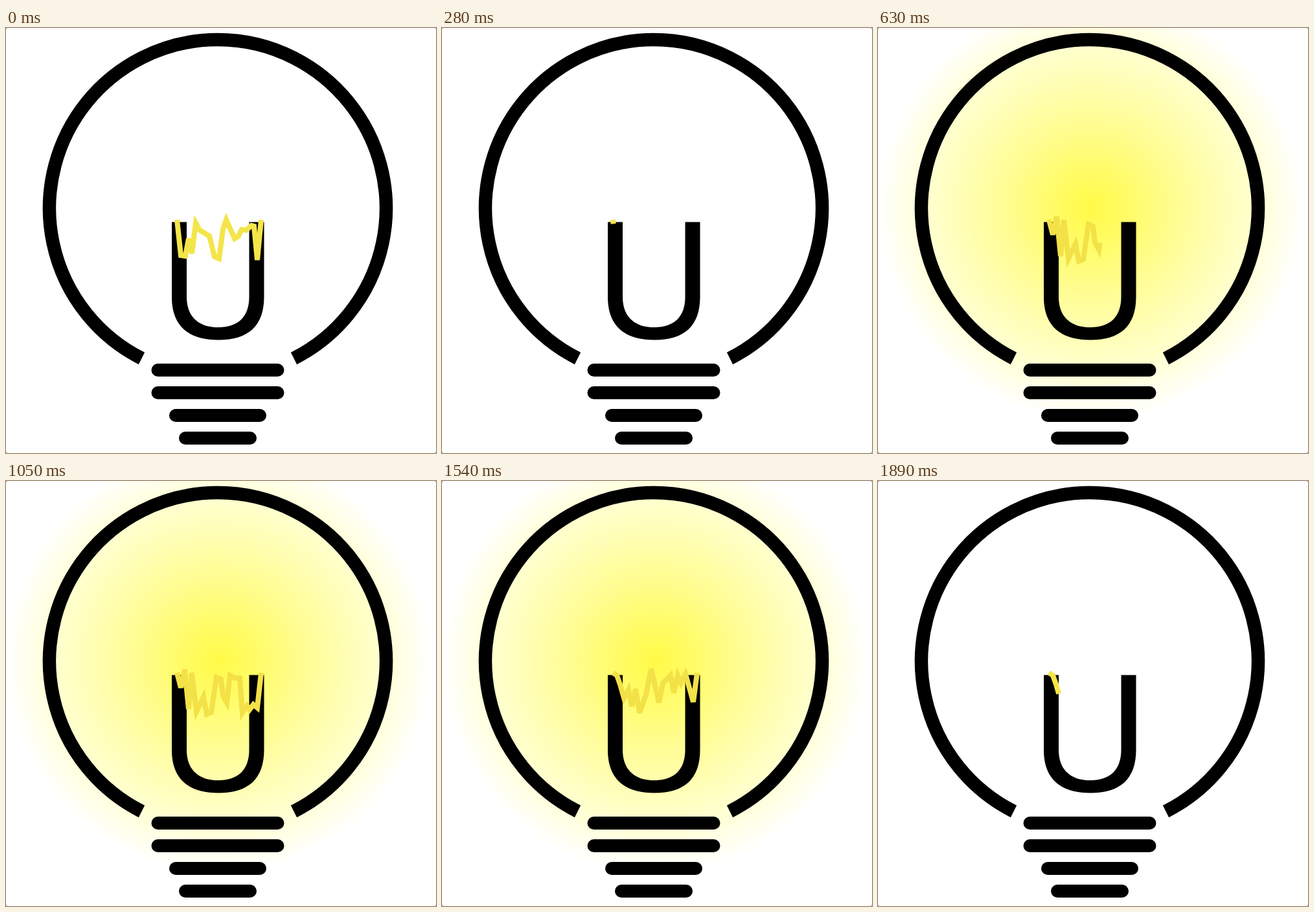
An HTML page without scripts for the animation above (1.96 s loop, 664x656 px).

```html
<!DOCTYPE html>
<html lang="en">
<head>
<meta charset="utf-8">
<title>Light bulb</title>
<style>
  html, body { margin: 0; width: 100%; height: 100%; overflow: hidden; background: #888; }
  svg { display: block; width: 664px; height: 656px; }

  .glow, .spark { animation: 1960ms step-end infinite; }
  .glow { animation-name: glow; }
  .spark {
    fill: none;
    stroke: #f3e54a;
    stroke-width: 8;
    stroke-dasharray: 100 200;
    stroke-dashoffset: 100;
  }
  .a { animation-name: fade-out; }
  .b { animation-name: pulse, warm; }
  .c { animation-name: flash, warm; }

  @keyframes glow {
    0%, 82.14% { opacity: 0; }
    17.85% { opacity: 1; }
  }
  @keyframes warm {
    0%, 82.14% { stroke: #f3e54a; }
    17.85% { stroke: #f3e148; }
  }
  /* The sparks run in and out along their own line */
  @keyframes fade-out {
    0% { stroke-dashoffset: 0; animation-timing-function: steps(4); }
    14.28% { stroke-dashoffset: 98.7; }
    17.85%, 100% { stroke-dashoffset: 100; }
  }
  @keyframes pulse {
    0% { stroke-dashoffset: 100; }
    17.85% { stroke-dashoffset: 73; animation-timing-function: steps(2); }
    25% { stroke-dashoffset: 3; }
    28.57% { stroke-dashoffset: 8; animation-timing-function: steps(3); }
    39.28% { stroke-dashoffset: 82; }
    42.85% { stroke-dashoffset: 94; animation-timing-function: steps(3); }
    53.57% { stroke-dashoffset: 0; }
    57.14% { stroke-dashoffset: 16; animation-timing-function: steps(3); }
    67.85% { stroke-dashoffset: 90; }
    71.42%, 100% { stroke-dashoffset: 100; }
  }
  @keyframes flash {
    0% { stroke-dashoffset: 100; }
    71.42% { stroke-dashoffset: 80; animation-timing-function: steps(2); }
    78.57% { stroke-dashoffset: 0; }
    82.14% { stroke-dashoffset: 0; animation-timing-function: steps(4); }
    96.42%, 100% { stroke-dashoffset: 92.5; }
  }
</style>
</head>
<body>
<svg viewBox="0 0 664 656">
  <defs>
    <radialGradient id="light">
      <stop offset="0" stop-color="#fffa46"/>
      <stop offset=".2" stop-color="#fffc6c"/>
      <stop offset=".4" stop-color="#fffd92"/>
      <stop offset=".6" stop-color="#fffeb4"/>
      <stop offset=".76" stop-color="#ffffce"/>
      <stop offset=".88" stop-color="#ffffe8"/>
      <stop offset="1" stop-color="#fff"/>
    </radialGradient>
  </defs>

  <rect width="664" height="656" rx="3" fill="#fff"/>
  <circle class="glow" cx="329" cy="278" r="328" fill="url(#light)"/>

  <path d="M209.5 510A260 260 0 1 1 444.5 510" fill="none" stroke="#000" stroke-width="20.5"/>
  <path d="M256 299.5V415C256 460 282 481.5 328 481.5S398.500 460 398.500 415V299.500H375.500V415C375.500 446 358 462 328 462S279 446 279 415V299.500Z"/>

  <g stroke="#000" stroke-width="20" stroke-linecap="round">
    <path d="M234.500 528H419.500M234.500 563H419.500M262 598H392M277 633H377"/>
  </g>

  <path class="spark a" pathLength="100" d="M264 296L270 351 277 352 282 325 287 348 293 301 299 312 314 321 322 353 329 356 335 311 340 296 353 325 359 321 364 311 371 312 379 305 383 306 388 358 394 296"/>
  <path class="spark b" pathLength="100" d="M264 296L270 319 276 291 282 352 287 296 294 356 305 333 310 360 317 357 325 303 332 306 335 331 341 342 346 300 353 304 361 304 365 358 372 347 376 353 382 345 388 350 394 296"/>
  <path class="spark c" pathLength="100" d="M264 296L270 300 275 314 281 335 288 322 293 348 299 321 305 358 315 330 323 290 335 342 341 312 353 300 358 327 364 300 369 312 376 298 388 341 394 296"/>
</svg>
</body>
</html>
```
